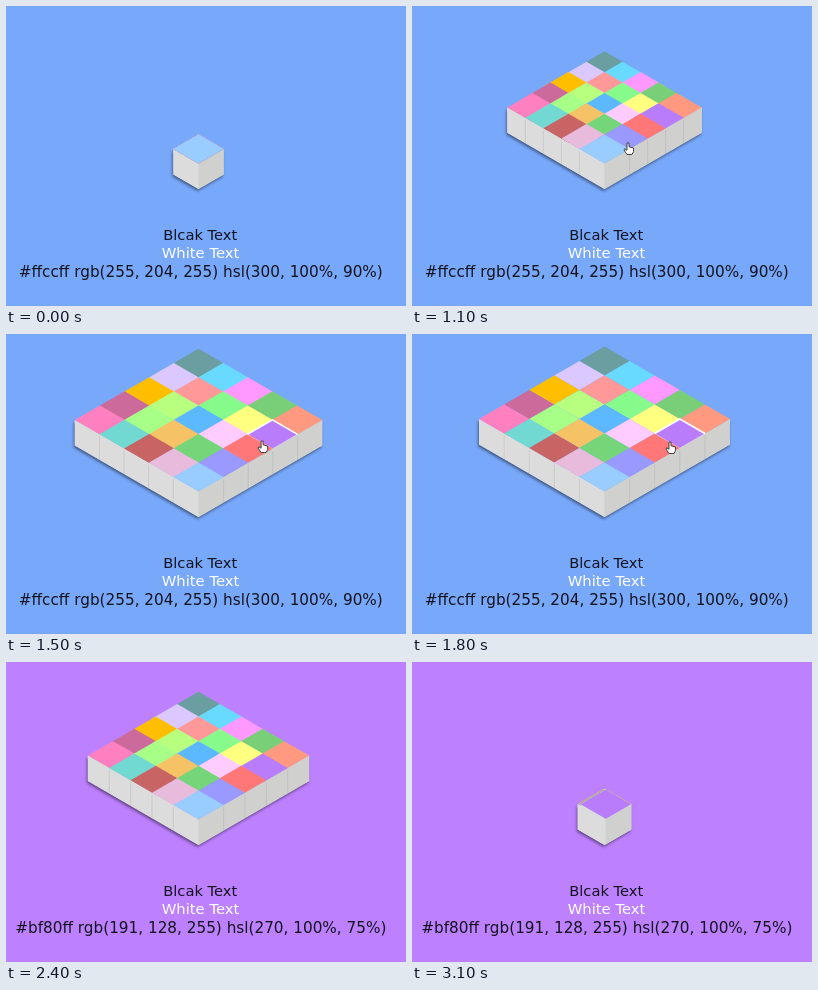
These frames come from a looping animation (400x300 px, 3.2 s). An HTML page with a canvas:

```html
<!DOCTYPE html>
<html lang="en">
<head>
<meta charset="utf-8">
<title>Isometric colour picker</title>
<style>
  html, body { margin: 0; width: 100%; height: 100%; overflow: hidden; }
  canvas { display: block; width: 400px; height: 300px; }
</style>
</head>
<body>
<canvas id="stage" width="400" height="300"></canvas>
<script>
const ctx = document.getElementById('stage').getContext('2d');

const LOOP = 3200;
const OPEN = 675, PICK = 1900, CLOSE = 2270, RAISE = 2450, SLIDE = 1000;
const CX = 192.5, FRONT = 157.5, HALF = 25.1, WALL = 25.4;
const SLOPE = Math.tan(Math.PI / 6);
const LEFT_WALL = '#dcdcdc', RIGHT_WALL = '#d0d0ce';

// Rows run from the front corner to the left, columns to the right.
const COLORS = [
  ['#99ccff', '#9999ff', '#ff7777', '#b97dfc', '#ff9980'],
  ['#e8bbdd', '#74d678', '#ffccff', '#ffff80', '#78cf78'],
  ['#c86464', '#f6c266', '#5cb8ff', '#86fb8c', '#ff99ff'],
  ['#72d8d2', '#a8ff88', '#b8ff80', '#ff9999', '#68daff'],
  ['#ff80c0', '#cc6a9c', '#ffbf00', '#dac8ff', '#6a9ea0']
];
const PICKED = { col: 3, row: 0 };

const THEMES = {
  before: { bg: '#78a8fa', label: '#ffccff rgb(255, 204, 255) hsl(300, 100%, 90%)' },
  after: { bg: '#bd80ff', label: '#bf80ff rgb(191, 128, 255) hsl(270, 100%, 75%)' }
};

// Pointer stops: time, x, y
const POINTER = [
  [400, 250, 94], [660, 209, 149], [750, 209, 149], [1100, 216, 137],
  [1450, 256, 107], [1800, 258, 108], [2080, 258, 108], [2360, 385, 160]
];

const clamp = v => Math.max(0, Math.min(1, v));
const mix = (a, b, k) => a + (b - a) * k;

// cubic-bezier(.25, .1, .25, 1)
function ease(x) {
  x = clamp(x);
  const curve = (u, a, b) => 3 * a * u * (1 - u) ** 2 + 3 * b * u * u * (1 - u) + u ** 3;
  let lo = 0, hi = 1;
  for (let n = 0; n < 24; n++) {
    const mid = (lo + hi) / 2;
    if (curve(mid, .25, .25) < x) lo = mid; else hi = mid;
  }
  return curve(lo, .1, 1);
}

function spread(t) {
  return t < CLOSE ? ease((t - OPEN) / SLIDE) : 1 - ease((t - CLOSE) / SLIDE);
}

function trace(points) {
  ctx.beginPath();
  points.forEach(([x, y], i) => i ? ctx.lineTo(x, y) : ctx.moveTo(x, y));
}

function fill(points, color) {
  trace(points);
  ctx.closePath();
  ctx.fillStyle = color;
  ctx.fill();
}

function line(points, color, width) {
  trace(points);
  ctx.strokeStyle = color;
  ctx.lineWidth = width;
  ctx.stroke();
}

function corners(col, row, step) {
  const x = CX + (col - row) * step;
  const y = FRONT - (col + row) * step * SLOPE;
  const h = HALF * SLOPE;
  return [[x - HALF, y - h], [x, y - 2 * h], [x + HALF, y - h], [x, y]];
}

function drawTile(col, row, step) {
  fill(corners(col, row, step), COLORS[row][col]);
}

// Two walls that meet below the front corner (x, y), each w wide.
function drawSides(x, y, w) {
  const side = y - w * SLOPE;
  fill([[x - w, side], [x, y], [x, y + WALL], [x - w, side + WALL]], LEFT_WALL);
  fill([[x + w, side], [x, y], [x, y + WALL], [x + w, side + WALL]], RIGHT_WALL);
}

function drawWalls(step) {
  const w = HALF + 4 * step, side = FRONT - w * SLOPE;
  const left = CX - w, right = CX + w, base = FRONT + WALL;

  ctx.save();
  ctx.shadowColor = 'rgba(0,0,0,.45)';
  ctx.shadowBlur = 3;
  ctx.shadowOffsetX = -1;
  ctx.shadowOffsetY = 2;
  fill([[left, side], [CX, FRONT], [right, side],
        [right, side + WALL], [CX, base], [left, side + WALL]], LEFT_WALL);
  ctx.restore();
  drawSides(CX, FRONT, w);

  if (step < 3) return;
  for (let k = 0; k < 4; k++) {
    const dx = HALF + k * step, y = FRONT - dx * SLOPE;
    for (const x of [CX - dx, CX + dx])
      line([[x, y + 2], [x, y + WALL]], 'rgba(110,110,110,.15)', 1);
  }
}

function drawBoard(t) {
  const step = HALF * spread(t);
  const rim = corners(PICKED.col, PICKED.row, step);
  drawWalls(step);
  for (let depth = 8; depth >= 0; depth--)
    for (let col = 0; col < 5; col++) {
      const row = depth - col;
      if (row >= 0 && row < 5) drawTile(col, row, step);
    }

  if (t >= RAISE) {
    drawSides(...rim[3], HALF);
    drawTile(PICKED.col, PICKED.row, step);
  }
  if (t >= 1350 && t < 2150) {
    line(rim.slice(0, 3), '#fff', 1.6);
    line([rim[2], rim[3], rim[0]], 'rgba(255,255,255,.3)', 1);
  } else if (t >= 640 && t < 800) {
    line(corners(0, 0, step).slice(0, 3), 'rgba(255,245,250,.8)', 1.2);
  }
}

function drawArrow() {
  const shape = [[0, 0], [0, 8.6], [2, 6.9], [3.4, 9.6], [4.8, 9], [3.5, 6.3], [6, 6]];
  fill(shape, '#fff');
  line([...shape, shape[0]], '#444', .8);
}

function drawHand() {
  const shape = [[-1, 0], [1, 0], [1, 3.8], [5.5, 5], [5.5, 8.5], [4, 11.5],
                 [-1, 11.5], [-4, 7], [-3.4, 5.8], [-1, 7.2]];
  fill(shape, '#fff');
  line([...shape, shape[0]], '#333', .9);
}

function drawPointer(t) {
  const i = POINTER.findIndex(p => p[0] > t);
  if (i < 1) return;
  const [t0, x0, y0] = POINTER[i - 1], [t1, x1, y1] = POINTER[i];
  const k = (t - t0) / (t1 - t0), s = k * k * (3 - 2 * k);
  ctx.save();
  ctx.translate(mix(x0, x1, s), mix(y0, y1, s));
  if (t > 750 && t < 2230) drawHand(); else drawArrow();
  ctx.restore();
}

function write(text, x, y, size, color) {
  ctx.font = size + 'px "DejaVu Sans", sans-serif';
  ctx.textAlign = 'center';
  ctx.fillStyle = color;
  ctx.fillText(text, x, y);
}

function draw(t) {
  const theme = t < PICK ? THEMES.before : THEMES.after;
  ctx.fillStyle = theme.bg;
  ctx.fillRect(0, 0, 400, 300);
  drawBoard(t);
  write('Blcak Text', 194.2, 234, 14.7, '#141420');
  write('White Text', 194.5, 252, 14.8, '#fff');
  write(theme.label, 194.8, 271, 15.25, '#141420');
  drawPointer(t);
}

const start = performance.now();
function tick() {
  draw((performance.now() - start) % LOOP);
  requestAnimationFrame(tick);
}
tick();
</script>
</body>
</html>
```
